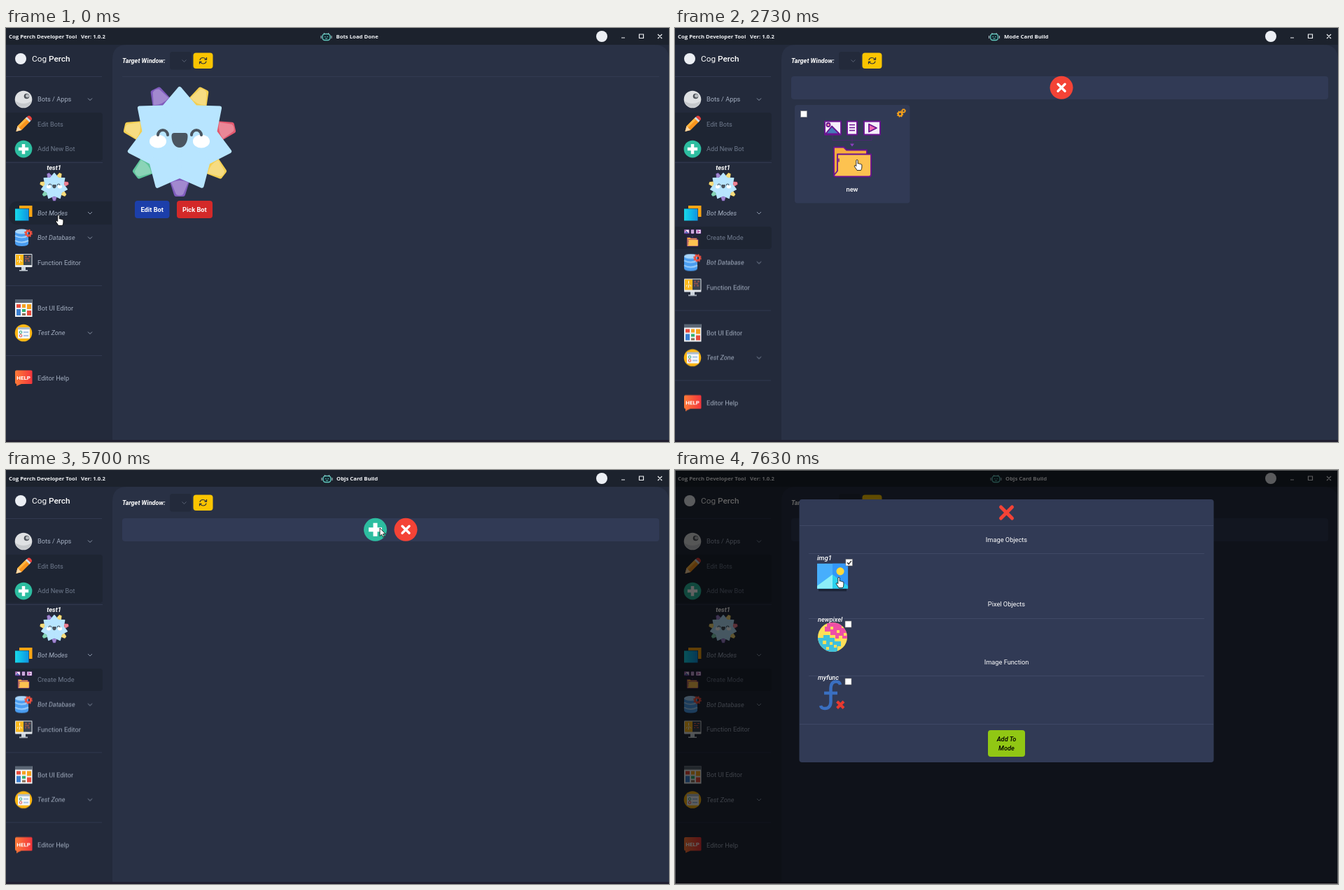
Write an HTML page that moves like this. It is 947 px wide and 592 px high and loops after 8 s.

```html
<!DOCTYPE html>
<html lang="en">
<head>
<meta charset="utf-8">
<title>Bot editor</title>
<style>
html, body { margin: 0; height: 100%; overflow: hidden; background: #232a3b; }
svg.stage { display: block; width: 100vw; height: 100vh; font: 9.24px Roboto, sans-serif; }
.nav { fill: #a3aec0; }
.dim { fill: #6f7a8d; }
.i { font-style: italic; }
.b { font-weight: 700; }
.w { fill: #fff; }
.m { text-anchor: middle; }
.bar { font: 700 7.75px "Open Sans", sans-serif; fill: #f2f4f7; }
.rule { stroke: #313950; }
.chev { fill: none; stroke: #8d98ab; stroke-width: 1; }

/* One loop is 8 s, so 1% is 80 ms */
.home, .mode, .objs, .hand, .arrow, .serif, .sans, .tick { animation: 8s step-end infinite; }
.home { animation-name: home; }
.mode { animation-name: mode; }
.objs { animation-name: objs; }
.hand { animation-name: hand; }
.arrow { animation-name: arrow; }
.serif { animation-name: serif; }
.sans { animation-name: sans; }
.tick { animation-name: tick; }
@keyframes home { 0% { opacity: 1 } 9%, to { opacity: 0 } }
@keyframes mode { 0% { opacity: 0 } 9% { opacity: 1 } 34.5%, to { opacity: 0 } }
@keyframes objs { 0% { opacity: 0 } 34.5%, to { opacity: 1 } }
@keyframes hand { 0% { opacity: 1 } 20.5% { opacity: 0 } 21.5% { opacity: 1 } 34.5% { opacity: 0 } 91%, to { opacity: 1 } }
@keyframes arrow { 0% { opacity: 0 } 20.5% { opacity: 1 } 21.5% { opacity: 0 } 34.5% { opacity: 1 } 91%, to { opacity: 0 } }
@keyframes serif { 0% { opacity: 1 } 82.1%, to { opacity: 0 } }
@keyframes sans { 0% { opacity: 0 } 82.1%, to { opacity: 1 } }
@keyframes tick { 0% { opacity: 0 } 95.3%, to { opacity: 1 } }

.lower { animation: lower 8s linear infinite; }
@keyframes lower {
  0%, 8.8% { transform: translateY(0) }
  10% { transform: translateY(22px) }
  11.25% { transform: translateY(33px) }
  12%, to { transform: translateY(35.5px) }
}
.sub { animation: sub 8s linear infinite; }
@keyframes sub {
  0%, 9% { transform: translateX(33px); opacity: 0 }
  11.25% { transform: translateX(3.5px); opacity: .9 }
  12%, to { transform: none; opacity: 1 }
}
.subbox { animation: subbox 8s linear infinite; transform-origin: 0 284px; }
@keyframes subbox { 0%, 9% { transform: scaleY(0) } 11.25%, to { transform: none } }
.card { animation: card 8s linear infinite; }
@keyframes card {
  0%, 9.45% { transform: translateY(33px); opacity: 0; animation-timing-function: ease-in-out }
  14.5%, to { transform: none; opacity: 1 }
}
.ghost { animation: ghost 8s linear infinite; }
@keyframes ghost { 0%, 9.45% { opacity: 0 } 11.25% { opacity: .05 } 14%, to { opacity: 0 } }
.veil { animation: veil 8s linear infinite; }
@keyframes veil { 0%, 71.6% { opacity: 0 } 76.8%, to { opacity: 1 } }
.dialog { animation: dialog 8s linear infinite; }
@keyframes dialog {
  0%, 71.6% { transform: translateY(-33px); animation-timing-function: ease-out }
  76.8%, to { transform: none }
}
.pick { animation: pick 8s linear infinite; transform-origin: 225px 148px; }
@keyframes pick {
  0%, 92.4% { transform: none; animation-timing-function: ease-out }
  95.3%, to { transform: scale(1.05) }
}
.cursor { animation: cursor 8s linear infinite; }
@keyframes cursor {
  0% { transform: translate(75px, 267px); animation-timing-function: step-end }
  .87% { transform: translate(76px, 264px); animation-timing-function: step-end }
  1.25%, 19.4% { transform: translate(77px, 261px); animation-timing-function: ease-out }
  23.6%, 25.8% { transform: translate(249px, 196px) }
  27.5%, 48.3% { transform: translate(260px, 188px); animation-timing-function: step-end }
  48.37% { transform: translate(281px, 188px); animation-timing-function: cubic-bezier(.2, .35, .6, 1) }
  58.3%, 58.7% { transform: translate(535px, 106px); animation-timing-function: ease-out }
  63.3%, 81.5% { transform: translate(534px, 83px); animation-timing-function: step-end }
  81.6% { transform: translate(532px, 86px); animation-timing-function: ease-in-out }
  91.6%, to { transform: translate(234px, 153px) }
}
</style>
</head>
<body>
<svg class="stage" viewBox="0 0 947 592">
<defs>
  <path id="chev" class="chev" d="M-3-1.5 0 1.5 3-1.5"/>
  <g id="ray">
    <path d="M-15-46-5-78H5L15-46Z" fill="currentColor" stroke="currentColor" stroke-width="6" stroke-linejoin="round"/>
    <path d="M-12-61-5-78Q0-81 5-78L12-61Q0-55-12-61Z" fill="#fff" opacity=".28"/>
  </g>
  <path id="spoke" d="M0 0-22-47 0-73 22-47Z" fill="#b8e5ff" stroke="#b8e5ff" stroke-width="6" stroke-linejoin="round"/>
  <g id="sun">
    <g id="rays"></g>
    <g id="spokes"></g>
    <ellipse cx="-31" cy="2" rx="12" ry="9.5" fill="#fff"/>
    <ellipse cx="31" cy="2" rx="12" ry="9.5" fill="#fff"/>
    <path d="M-31-7a7 7 0 0 1 14 0M17-7a7 7 0 0 1 14 0" fill="none" stroke="#4a5560" stroke-width="4" stroke-linecap="round"/>
    <path d="M-8-10H8Q12-10 11.500-4C11 5 6 11 0 11S-11 5-11.500-4Q-12-10-8-10Z" fill="#4a5560"/>
  </g>
  <g id="plus">
    <circle r="16.500" fill="#2dbda0"/>
    <path d="M0-9.500V9.500M-9.500 0H9.500" stroke="#fff" stroke-width="6"/>
  </g>
  <g id="close">
    <circle r="16.500" fill="#f44336"/>
    <path d="M-5-5 5 5M5-5-5 5" stroke="#fff" stroke-width="3.400" stroke-linecap="round"/>
  </g>
  <g id="gear">
    <circle r="3.800" fill="none" stroke="currentColor" stroke-width="3"/>
    <circle r="5.600" fill="none" stroke="currentColor" stroke-width="1.800" stroke-dasharray="2.200 2.200"/>
  </g>
  <g id="folder" stroke="#6a1290" stroke-width="1.800" stroke-linejoin="round">
    <g fill="#f5effb">
      <path d="M1 1H24V20H1ZM33 1H47V20H33ZM57 1H80V20H57Z"/>
      <path d="M2 19 11 8 22 19Z" fill="#4779b8"/>
      <circle cx="6" cy="6" r="2.500" fill="#f6a0a0"/>
      <path d="M36 6H44M36 10H44M36 14H44" stroke-width="1.500"/>
      <path d="M64 5V16L75 10.500Z" fill="#f06ab0"/>
    </g>
    <path d="M12 21V28H68V21M40 21V33" fill="none" opacity=".45" stroke-width="1"/>
    <path d="M37 33H43L40 37Z" fill="#8d3fc0" stroke="none"/>
    <path d="M14 78V38H28L32 42H61V50" fill="#f6ad3c"/>
    <path d="M19 48H67V77Q67 80 64 80H17Q14 80 14 78L19 72Z" fill="#fdc250"/>
    <path d="M21 54V59" stroke-width="1.500"/>
  </g>
  <g id="robot" fill="none" stroke="#62c7bd">
    <rect x="2" y="2.500" width="11" height="9" rx="3.500" fill="#142a33" stroke-width="1.400"/>
    <path d="M0 5V9M15 5V9M4 1 5 2.500M11 1 10 2.500" stroke="#b6c8d0"/>
    <path d="M5 6.500H6.500M8.500 6.500H10M6 9H9" stroke-width="1"/>
  </g>
  <rect id="box" width="9" height="9" fill="#fff" stroke="#767676" stroke-width=".6"/>
  <linearGradient id="sea"><stop stop-color="#19d8e8"/><stop offset=".5" stop-color="#0fb8e8"/><stop offset="1" stop-color="#1292e0"/></linearGradient>
  <linearGradient id="flame"><stop stop-color="#ff7b38"/><stop offset="1" stop-color="#f2353c"/></linearGradient>
  <clipPath id="disc"><circle cx="225" cy="239" r="21"/></clipPath>
</defs>

<rect width="947" height="592" fill="#232a3b"/>
<rect width="947" height="24" fill="#1c222d"/>
<path d="M152 589V45Q152 24 173 24H926Q947 24 947 45V589Z" fill="#293145"/>
<rect y="589" width="947" height="3" fill="#211f30"/>

<!-- title bar -->
<g class="bar">
  <text x="4" y="15">Cog Perch Developer Tool</text>
  <text x="107" y="15">Ver: 1.0.2</text>
  <g class="home"><use href="#robot" x="450" y="6"/><text x="471.500" y="15">Bots Load Done</text></g>
  <g class="mode"><use href="#robot" x="448.500" y="6"/><text x="470" y="15">Mode Card Build</text></g>
  <g class="objs"><use href="#robot" x="451" y="6"/><text x="472" y="15">Objs Card Build</text></g>
</g>
<circle cx="851" cy="12" r="8" fill="#eceff4"/>
<path d="M879 14H884M904.500 9H910.500V14.500H904.500ZM931 9 937 15M937 9 931 15" fill="none" stroke="#f0f2f5" stroke-width="1.200"/>

<!-- upper sidebar -->
<circle cx="21" cy="44" r="8" fill="#eceff4"/>
<text x="37" y="48" class="w" font-size="11.800">Cog <tspan font-weight="500">Perch</tspan></text>
<path class="rule" d="M0 69.500H137M0 192.500H138"/>
<rect x="-4" y="121" width="142" height="69" rx="4" fill="#1e2533"/>
<circle cx="25" cy="102" r="12.300" fill="#dfe1e3"/>
<path d="M13 104A12.300 12.300 0 0 0 37 104Q25 112 13 104Z" fill="#c6c9cc"/>
<circle cx="29.500" cy="97.500" r="3.800" fill="#4c5158"/><circle cx="30.500" cy="97" r="2.500" fill="#b8bcc0"/>
<g transform="translate(25 137.500) rotate(45)">
  <path d="M-4-9H4V8L0 15-4 8Z" fill="#f7941e"/><path d="M-4-9H-1V8H-4Z" fill="#ffb640"/>
  <path d="M-4 8H4L0 15Z" fill="#fbd9a8"/><path d="M-4-11H4V-8H-4Z" fill="#d5dbe0"/><path d="M-4-11Q-4-15 0-15T4-11Z" fill="#e8413c"/>
</g>
<use href="#plus" transform="translate(25 173) scale(.75)"/>
<text class="nav" x="45" y="105.300">Bots / Apps</text><use href="#chev" x="120" y="102"/>
<text class="dim" x="45" y="140.800">Edit Bots</text>
<text class="dim" x="45" y="176.300">Add New Bot</text>
<text class="w b i m" x="68.500" y="202.500">test1</text>
<use href="#sun" transform="translate(69 226.500) scale(.257)"/>
<path class="home" d="M151 248H16Q4 248 4 264.500T16 281H151Z" fill="#1e2533"/>
<path d="M19 254H37.500V270H33V258H19Z" fill="#fba514"/>
<rect x="13" y="258.500" width="19.500" height="17" fill="url(#sea)"/>
<text class="nav i" x="45" y="267.800">Bot Modes</text><use href="#chev" x="120" y="264.500"/>

<!-- submenu -->
<rect class="subbox" x="-4" y="284" width="142" height="32" rx="4" fill="#1e2533"/>
<g class="sub">
  <use href="#folder" transform="translate(13 288) scale(.3)"/>
  <text class="dim" x="45" y="303.300">Create Mode</text>
</g>

<!-- lower sidebar -->
<g class="lower">
  <path d="M13 291V308Q13 312 22.500 312T32 308V291Z" fill="#4a9df0"/>
  <path d="M13 297Q22 302 32 297M13 304Q22 309 32 304" fill="none" stroke="#9fd0fb" stroke-width="2"/>
  <ellipse cx="22.500" cy="291" rx="9.500" ry="3.500" fill="#a9d6fb"/>
  <g color="#ee5140"><use href="#gear" transform="translate(32 293.500) scale(.9)"/></g>
  <text class="nav i" x="45" y="303.300">Bot Database</text><use href="#chev" x="120" y="300"/>

  <path d="M22 341H28V346H31V347.500H19V346H22Z" fill="#c9d1da"/>
  <rect x="13" y="323" width="24.500" height="19" rx="1" fill="#e2e6ea"/>
  <rect x="14" y="324" width="11" height="15" fill="#fbb81c"/><rect x="25" y="324" width="11.500" height="15" fill="#39424f"/>
  <path d="M19.500 326V330M16 334 17.500 332M23 334 21.500 332M19 336 20 331" stroke="#fff" fill="none"/>
  <path d="M27 327H30M32 327H35M27 330H33M27 333H29M31 333H34" stroke="#e5604c"/>
  <text class="nav" x="45" y="338.800">Function Editor</text>
  <path class="rule" d="M0 368.500H137M0 468.500H137"/>

  <rect x="13" y="388" width="24.500" height="25" fill="#f1f3f5"/><rect x="13" y="388" width="24.500" height="5" fill="#5b6675"/>
  <path d="M15 395H21V400H15ZM30 404H36V411H30Z" fill="#ea4b3c"/><path d="M23 395H28V400H23ZM30 395H36V402H30Z" fill="#f6a21e"/>
  <path d="M15 402H21V411H15Z" fill="#3b7fd0"/><path d="M23 402H28V406H23Z" fill="#31b06e"/><path d="M23 408H28V411H23Z" fill="#8a6c54"/>
  <text class="nav" x="45" y="403.800">Bot UI Editor</text>

  <circle cx="25" cy="436" r="12.300" fill="#fbb614"/>
  <rect x="17" y="428" width="17" height="16" rx="1" fill="#f4f7fa"/><rect x="17" y="428" width="17" height="3" fill="#aebccb"/>
  <circle cx="21" cy="435" r="1.800" fill="none" stroke="#25a77c"/><circle cx="21" cy="440" r="1.800" fill="none" stroke="#e34a42"/>
  <path d="M25 435H32M25 440H32" stroke="#8fb4e0" stroke-width="1.600"/>
  <text class="nav i" x="45" y="439.300">Test Zone</text><use href="#chev" x="120" y="436"/>

  <path d="M15 489.500H36Q37.500 489.500 37.500 491V508Q37.500 509 36 509H22L15 512V509Q13 509 13 507V491.500Q13 489.500 15 489.500Z" fill="url(#flame)"/>
  <text class="w b m" x="25.200" y="502.700" font-size="8">HELP</text>
  <text class="nav" x="45" y="504.300">Editor Help</text>
</g>

<!-- main panel -->
<text class="w b i" x="166" y="50.200" font-size="9.100">Target Window:</text>
<rect x="234" y="34" width="31" height="25.500" rx="4" fill="#232a3b"/><use href="#chev" x="254.500" y="47" opacity=".5"/>
<rect x="267.500" y="35.500" width="28" height="22.500" rx="4" fill="#fbc500"/>
<path d="M277 46Q277.500 42.500 281.500 42.500Q284 42.500 286 45M286.500 42V45.200H283.500M286 47.500Q285.500 51 281.500 51Q279 51 277 48.500M276.500 51.500V48.300H279.500" fill="none" stroke="#232a3b" stroke-width="1.200"/>

<g class="home">
  <path class="rule" d="M166 69.500H933"/>
  <use href="#sun" x="248" y="160"/>
  <rect x="184" y="247" width="49.500" height="25" rx="4" fill="#1c3faa"/><text class="w b m" x="208.700" y="262.800" font-weight="500">Edit Bot</text>
  <rect x="244" y="247" width="51" height="25" rx="4" fill="#d32929"/><text class="w b m" x="269.300" y="262.800">Pick Bot</text>
</g>
<g class="mode">
  <rect x="166" y="69" width="767" height="33" rx="4" fill="#313a55"/>
  <use href="#close" x="552" y="85.300"/>
  <rect class="ghost" x="166" y="116" width="256" height="183"/>
  <g class="card">
    <rect x="171" y="110" width="164.500" height="140.500" rx="4" fill="#313a55"/>
    <use href="#box" x="179.500" y="118.500"/>
    <g color="#f6a01a"><use href="#gear" transform="translate(321.500 123) scale(.72)"/><use href="#gear" transform="translate(326.500 118.500) scale(.52)"/></g>
    <use href="#folder" x="213" y="132.500"/>
    <text class="w m" x="253" y="234.300" font-weight="500">new</text>
  </g>
</g>
<g class="objs">
  <rect x="166" y="69" width="767" height="33" rx="4" fill="#313a55"/>
  <use href="#plus" x="527.500" y="85.300"/>
  <use href="#close" x="571" y="85.300"/>
</g>

<!-- dialog -->
<g class="veil">
  <rect width="947" height="592" opacity=".62"/>
  <rect x=".5" y=".5" width="946" height="591" fill="none" stroke="#a8a8a8" stroke-dasharray="1 1"/>
  <g class="dialog">
    <rect x="177.500" y="42" width="592" height="376" rx="4" fill="#313a55"/>
    <path d="M178 79.500H769M191 119.500H756M191 212.500H756M191 294.500H756M178 363.500H769" stroke="#3f4865"/>
    <path d="M465.500 53 481.500 69M481.500 53 465.500 69" stroke="#f44336" stroke-width="5"  stroke-linecap="round"/>
    <g class="w m">
      <text x="473.500" y="102.600">Image Objects</text>
      <text x="473.500" y="195.400">Pixel Objects</text>
      <text x="473.500" y="277.600">Image Function</text>
    </g>
    <g class="pick">
      <path class="tick" d="M206 170H244" stroke="#1c2336" stroke-width="4" opacity=".3"/>
      <rect x="204" y="134.500" width="42" height="34" fill="#47aefc"/>
      <path d="M225 134.500H246V168.500L225 150Z" fill="#3398f8"/>
      <path d="M204 168.500V165L225 149.500 246 165V168.500Z" fill="#2bd2ef"/><path d="M204 168.500V165L225 149.500V168.500Z" fill="#8ceef8"/>
      <circle cx="235.500" cy="145" r="5.300" fill="#ffd93b"/>
      <text class="w i" x="204" y="129.800" font-weight="500">img1</text>
      <use href="#box" x="243" y="128.500"/>
      <path class="tick" d="M245 133 247 135.300 250.500 130.700" fill="none" stroke="#222" stroke-width="1.300"/>
    </g>
    <g clip-path="url(#disc)" shape-rendering="crispEdges">
      <rect x="203" y="217" width="44" height="44" fill="#fddf58"/>
      <path d="M217 217H247V241H239V237H234V241H229V236H222V231H214V224H217Z" fill="#ef4fa6"/>
      <path d="M222 224H226V228H222ZM231 229H235V233H231ZM238 222H242V226H238ZM241 233H245V237H241Z" fill="#fddf58"/>
      <path d="M203 240H212V236H221V240H228V245H237V252H232V261H203Z" fill="#3fc0dc"/>
      <path d="M211 244H216V249H211ZM221 246H225V250H221ZM216 253H220V257H216ZM227 250H231V254H227Z" fill="#fddf58"/>
    </g>
    <path d="M236 307Q235 302.500 230 302.500 223 302.500 222.500 312V332Q222 341 214 341 209 341 208 337M213 319H232" fill="none" stroke="#3a6fc0" stroke-width="4.500"/>
    <path d="M231.500 331 241 340.500M241 331 231.500 340.500" stroke="#e8392f" stroke-width="4"/>
    <g class="w i" font-weight="500">
      <text x="204" y="217.300">newpixel</text>
      <text x="204" y="299.500">myfunc</text>
    </g>
    <use href="#box" x="243" y="216"/><use href="#box" x="243" y="298"/>
    <rect x="447" y="372" width="53" height="38" rx="4" fill="#91c714"/>
    <g class="serif i m" font-family="Liberation Serif, serif" font-size="10"><text x="473.500" y="387.500">Add To</text><text x="473.500" y="401">Mode</text></g>
    <g class="sans i m" font-weight="500"><text x="473.500" y="387.500">Add To</text><text x="473.500" y="400.800">Mode</text></g>
  </g>
</g>

<g class="cursor" stroke="#000" stroke-width=".8" fill="#fff" stroke-linejoin="round">
  <path class="arrow" d="M0 0V11.500L2.600 9.100 4.400 13 6.200 12.200 4.500 8.400H8Z"/>
  <path class="hand" d="M-1.200 1.200Q0-.600 1.200 1.200V6Q2.600 5.200 3.200 6.300 4.600 5.800 5.100 6.800 6.700 6.500 6.900 7.800V11Q6.900 13.500 5.500 15.500H0Q-1.500 13-3.600 10.200-4.200 8.600-2.800 8.400L-1.200 9.600Z"/>
</g>
</svg>
<script>
// Seven coloured rays behind a seven-pointed body, offset by half a turn step
const colors = ['#f3cf52', '#e2596f', '#f3cf52', '#7f5cbd', '#5fc49c', '#f3cf52', '#7f5cbd'];
const turn = 360 / 7;
document.getElementById('rays').innerHTML = colors.map((c, k) =>
  `<use href="#ray" color="${c}" transform="rotate(${(k + .5) * turn})"/>`).join('');
document.getElementById('spokes').innerHTML = colors.map((c, k) =>
  `<use href="#spoke" transform="rotate(${k * turn})"/>`).join('');
</script>
</body>
</html>
```
